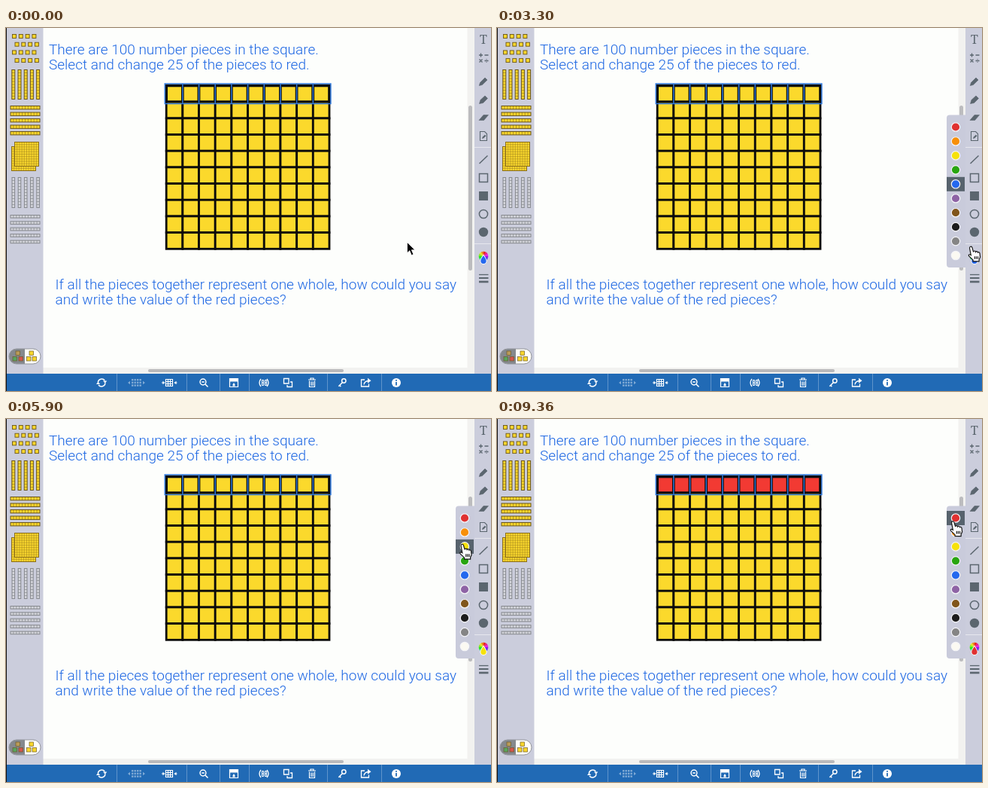
Write an HTML page that moves like this. It is 645x482 px and loops after 9.83 s.

```html
<!DOCTYPE html>
<html lang="en">
<head>
<meta charset="utf-8">
<title>Number pieces</title>
<style>
html, body { margin: 0; width: 100%; height: 100%; overflow: hidden; background: #fdfefc; }
svg { display: block; width: 645px; height: 482px; }
text { font-family: Roboto, Arial, sans-serif; }
</style>
</head>
<body>
<svg id="stage" viewBox="0 0 645 482" xmlns="http://www.w3.org/2000/svg">
  <rect width="645" height="482" fill="#fdfefc"/>
  <g id="scroll">
    <path d="M613.5 0H623V459H613.5Z M49 451H623V459H49Z" fill="#f2f2f0"/>
    <rect x="615" y="103" width="5" height="219" rx="2.5" fill="#bcbcbe"/>
    <rect x="189" y="453" width="260" height="4" rx="2" fill="#b9b9bb"/>
  </g>
  <g fill="#1c66e3" font-size="19" font-weight="300">
    <text x="57" y="35">There are 100 number pieces in the square.</text>
    <text x="57" y="55">Select and change 25 of the pieces to red.</text>
    <text x="65.5" y="347">If all the pieces together represent one whole, how could you say</text>
    <text x="65.5" y="367">and write the value of the red pieces?</text>
  </g>
  <g id="board"></g>
  <rect width="49.5" height="459" fill="#cbcddc"/>
  <g id="tray"></g>
  <g id="toggle">
    <rect x="4" y="426" width="42" height="20" rx="10" fill="#fffef8"/>
    <path d="M25 426H14a10 10 0 0 0 0 20H25Z" fill="#85898e"/>
    <rect x="4" y="426" width="42" height="20" rx="10" fill="none" stroke="#92959c"/>
  </g>
  <rect x="623" width="22" height="459" fill="#cbcddc"/>
  <g id="tools" fill="#5b666f" stroke="#5b666f" stroke-width="1.5">
    <text x="635" y="20.5" text-anchor="middle" stroke="none" style="font:16px 'Noto Serif',serif">T</text>
    <path d="M629 36H634M631.5 33.5V38.5M636.5 36H641.5M629.5 41.5l4 4m0-4l-4 4M636.5 43.5H641.5M639 41v.8M639 45.3v.8" fill="none" stroke-width="1.3"/>
    <path d="M629.3 76.5l1.2-4 6.5-6.5 3 3-6.7 6.5Z" stroke-width=".6"/>
    <path d="M629.5 100.5l1.5-5 6-5.5 3.5 3.5-6 6Z" stroke-width=".6"/>
    <path d="M629 122.5l6-7h6.5l-6 7Z" stroke-width=".6"/>
    <path d="M630.5 137.5h6l3 3v9h-9Z" fill="none" stroke-width="1.1"/>
    <path d="M633 147l.7-2.3 3.2-3 1.6 1.6-3.2 3Z" stroke="none"/>
    <path d="M629.5 180L640.5 169.5" fill="none"/>
    <rect x="629.5" y="193.5" width="11" height="11" fill="none"/>
    <rect x="629" y="217" width="12" height="12" stroke="none"/>
    <circle cx="635" cy="247" r="5.6" fill="none"/>
    <circle cx="635" cy="271" r="6.2" stroke="none"/>
    <path d="M629 327.500H641.5" stroke-width="1.3"/>
    <path d="M629 332H641.5" stroke-width="2"/>
    <path d="M629 337H641.5" stroke-width="2.6"/>
    <path d="M623 158.500H645M623 286.500H645" stroke="#e6e7ee" stroke-width="1"/>
  </g>
  <g id="wheel"></g>
  <path id="drop" d="M635 302C633.300 305 631.300 306.800 631.300 309.300a3.700 3.700 0 0 0 7.400 0C638.700 306.800 636.700 305 635 302Z" stroke="#fff" stroke-width="1.800" paint-order="stroke"/>
  <g id="panel"></g>
  <rect y="459" width="645" height="23" fill="#216ab5"/>
  <rect width="1" height="482" fill="#111"/>
  <g id="bar" fill="none" stroke="#fff" stroke-width="1.5">
    <path d="M147.500 459V482M240.500 459V482M284.500 459V482M323.500 459V482M427.500 459V482M499.500 459V482" stroke="#5f94cb" stroke-width="1"/>
    <path d="M122.300 470.500a5 5 0 0 1 9-2.500M132 471.500a5 5 0 0 1-9 2.500"/>
    <path d="M129 468.500h5.300l-2.500 3.300ZM120 473l2.500-3.300 2.700 3.300Z" fill="#fff" stroke="none"/>
    <g id="dots" fill="#80aad5" stroke="none"><path d="M162 471l3-2.300v4.600ZM185 471l-3-2.300v4.600Z"/></g>
    <path d="M207 471h3M224.500 471h3" stroke-width="1"/>
    <path d="M211.500 471l-3-2.300v4.600ZM223.500 471l3-2.300v4.600Z" fill="#fff" stroke="none"/>
    <path d="M212.500 466.500h9v9h-9ZM212.500 469.500h9M212.500 472.500h9M215.500 466.500v9M218.500 466.500v9" stroke-width="1.2"/>
    <circle cx="262" cy="470" r="3.9"/>
    <path d="M265 473l3.500 3.500M260.200 470h3.600"/>
    <path d="M297.500 465.500h11v11h-11Z" stroke-width="1.2"/>
    <path d="M297 465h12v4.500h-12ZM301.500 473.500l1.500-2.500 1.500 2.500v2h-3Z" fill="#fff" stroke="none"/>
    <path d="M339 466q-4 5 0 10M347 466q4 5 0 10" stroke-width="1.3"/>
    <path d="M340.500 467.500h2v7h-2ZM344.500 467.500h2v7h-2ZM340.500 471h2M344.500 471h2" stroke-width="1"/>
    <path d="M369.500 465.500h6.500v6.500h-6.500ZM378 470h2.500v6.500h-6.500v-2.500" stroke-width="1.3"/>
    <path d="M402 467h10M405 466.500v-1.500h4v1.500M403.500 468.500v8h7v-8M406 469.500v5.500M408.300 469.500v5.500" stroke-width="1.2"/>
    <circle cx="449.3" cy="468.5" r="2.7"/>
    <path d="M447.300 470.700l-5 5M443.500 474.300l1.800 1.800"/>
    <path d="M477 467h-4.500v9h10v-3.500M476 473.500q.5-4.500 6-5" stroke-width="1.3"/>
    <path d="M481 464.800l4.500 3.500-4.500 3.400Z" fill="#fff" stroke="none"/>
    <circle cx="519" cy="471" r="6" fill="#fff" stroke="none"/>
    <path d="M519 470v4.500M519 467v1.700" stroke="#216ab5" stroke-width="1.8"/>
  </g>
  <g id="cursor" stroke="#111">
    <path id="arrow" d="M.5.5V14.700l3.300-3 2.500 6 2.600-1.100-2.500-5.800h4.500Z" fill="#000" stroke="#fff" stroke-width=".8"/>
    <path id="hand" transform="scale(1.06)" d="M3.600 11.500L2 3.200C1.500.4 4.500-.1 5.200 2.200L6.700 7.500C7 5.800 9.300 5.900 9.600 7.500 10.200 6.300 12 6.700 12.200 8.200 13 7.400 14.500 7.900 14.700 9.500L15.200 14 13.800 17.200V19.400H6.200V17.600L1.200 12.800C-.1 11.200 1.700 9.900 3.600 11.500ZM8.300 13v3.500M10.300 13v3.500M12.300 13v3.500" fill="#fff" stroke-width="1.1"/>
  </g>
</svg>
<script>
const LOOP = 9830;
const $ = id => document.getElementById(id);
const YELLOW = '#fbd92c';

function add(parent, tag, attrs) {
  const el = document.createElementNS('http://www.w3.org/2000/svg', tag);
  for (const k in attrs) el.setAttribute(k, attrs[k]);
  return parent.appendChild(el);
}
function box(parent, x, y, width, height, fill, stroke = 'none', sw = 1) {
  return add(parent, 'rect', { x, y, width, height, fill, stroke, 'stroke-width': sw });
}
function blocks(x, y, cols, rows, w, h, fill, stroke, sw = .7) {
  let d = '';
  for (let i = 1; i < cols; i++) d += `M${x + i * w / cols} ${y}v${h}`;
  for (let j = 1; j < rows; j++) d += `M${x} ${y + j * h / rows}h${w}`;
  box($('tray'), x, y, w, h, fill, stroke, 1);
  add($('tray'), 'path', { d, fill: 'none', stroke, 'stroke-width': sw });
}

// Hundred square with its selected top row
const PITCH = 21.68, X0 = 213.2, Y0 = 76.5;
const topRow = [];
for (let r = 0; r < 10; r++) {
  for (let c = 0; c < 10; c++) {
    const cell = box($('board'), X0 + c * PITCH, Y0 + r * PITCH, PITCH, PITCH, YELLOW, '#0b0b0b', r ? 2.8 : 3.6);
    if (!r) topRow.push(cell);
  }
}
let ring = `M${X0 - 1.9} 74H${X0 + 10 * PITCH + 1.9}V100.5H${X0 - 1.9}Z`;
for (let c = 1; c < 10; c++) ring += `M${X0 + c * PITCH} 74V100.5`;
add($('board'), 'path', { d: ring, fill: 'none', stroke: '#2f78dc', 'stroke-width': 1.5 });

// Left tray
const BROWN = '#6b5618', GREY = '#85888d', PALE = '#d3d4da', GOLD = '#f8d62c';
for (let r = 0; r < 4; r++) {
  for (let c = 0; c < 4; c++) {
    box($('tray'), 8.5 + c * 8.8 + r % 2 * 3.5, 8.5 + r * 10.7, 5, 5, GOLD, BROWN, .9);
  }
}
for (let i = 0; i < 5; i++) {
  blocks(7.8 + i * 8.2, 55.5, 1, 10, 4, 39, GOLD, BROWN, .5);
  blocks(6, 103.5 + i * 8.5, 10, 1, 39, 4.4, GOLD, BROWN, .5);
  blocks(8 + i * 8.2, 198.5, 1, 10, 3.6, 40, PALE, GREY);
  blocks(6, 248.5 + i * 8.4, 10, 1, 39, 3.6, PALE, GREY);
}
blocks(7.5, 157.5, 10, 10, 32, 32, GOLD, '#8a6d1a', .4);
blocks(11.5, 151.5, 10, 10, 32, 32, GOLD, '#8a6d1a', .4);

[[13, 429, '#b99b58'], [9, 436.5, '#58a55c'], [17, 436.5, '#d4544d'],
 [31, 429, GOLD], [27.5, 436.5, GOLD], [35, 436.5, GOLD]]
  .forEach(([x, y, fill]) => box($('toggle'), x, y, 5.5, 5.5, fill, '#6b5a2a', .7));

for (let r = 0; r < 3; r++) {
  for (let c = 0; c < 4; c++) box($('dots'), 167 + c * 3.5, 466 + r * 3.7, 2.4, 2.4, '#80aad5');
}

// Colour wheel
for (let i = 0; i < 12; i++) {
  const at = a => `${635 + 6.3 * Math.sin(a)} ${303 - 6.3 * Math.cos(a)}`;
  const a = i * Math.PI / 6;
  add($('wheel'), 'path', {
    d: `M635 303L${at(a)}A6.3 6.3 0 0 1 ${at(a + .56)}Z`, fill: `hsl(${360 - i * 30} 82% 52%)`
  });
}

// Colour palette
add($('panel'), 'path', {
  d: 'M623 115.500H602a4 4 0 0 0-4 4V314a4 4 0 0 0 4 4H623V307l2-3.500-2-3.500Z', fill: '#c9cbdb'
});
const marker = box($('panel'), 598, 0, 24, 19, '#57636d');
const swatches = ['#e03131', '#f78f08', '#f6e20a', '#28a50f', '#2468ee',
                  '#8e63a5', '#80551b', '#1c1c1c', '#858585', '#fbf9f2'];
swatches.forEach((fill, i) => add($('panel'), 'circle', {
  cx: 610, cy: 131.5 + i * 18.95, r: 5.7, fill, stroke: '#f4f4f8', 'stroke-width': 1.2
}));

// [from ms, swatch, piece colour]
const picks = [[0, 4, YELLOW], [4060, 3, '#44b649'], [5500, 2, YELLOW],
               [6700, 1, '#f78f08'], [7860, 0, '#f23a33']];

// [start ms, end ms, x, y]
const moves = [[260, 760, 630, 304], [1200, 1530, 629.5, 303], [2930, 3000, 629.5, 304],
               [3200, 3660, 605, 185.5], [4300, 5030, 603, 171.5], [5730, 6200, 603, 151.5],
               [7430, 7560, 603, 134.5], [8630, 9360, 602.5, 135]];

function cursorAt(t) {
  let x = 533, y = 284;
  for (const [start, end, tx, ty] of moves) {
    const p = Math.min(1, Math.max(0, (t - start) / (end - start)));
    const e = p * p * (3 - 2 * p);
    x += (tx - x) * e;
    y += (ty - y) * e;
  }
  return [x, y];
}
const show = (el, on) => el.setAttribute('visibility', on ? 'visible' : 'hidden');

function draw(t) {
  const [, index, colour] = picks.filter(p => p[0] <= t).pop();
  topRow.forEach(cell => cell.setAttribute('fill', colour));
  $('drop').setAttribute('fill', swatches[index]);
  marker.setAttribute('y', 122 + index * 18.95);
  show($('panel'), t >= 2000);
  const [x, y] = cursorAt(t), over = x > 622 || t > 760;
  $('cursor').setAttribute('transform', `translate(${x} ${y})`);
  show($('arrow'), !over);
  show($('hand'), over);
}

const begin = performance.now();
function tick() {
  draw((performance.now() - begin) % LOOP);
  requestAnimationFrame(tick);
}
draw(0);
requestAnimationFrame(tick);
</script>
</body>
</html>
```
